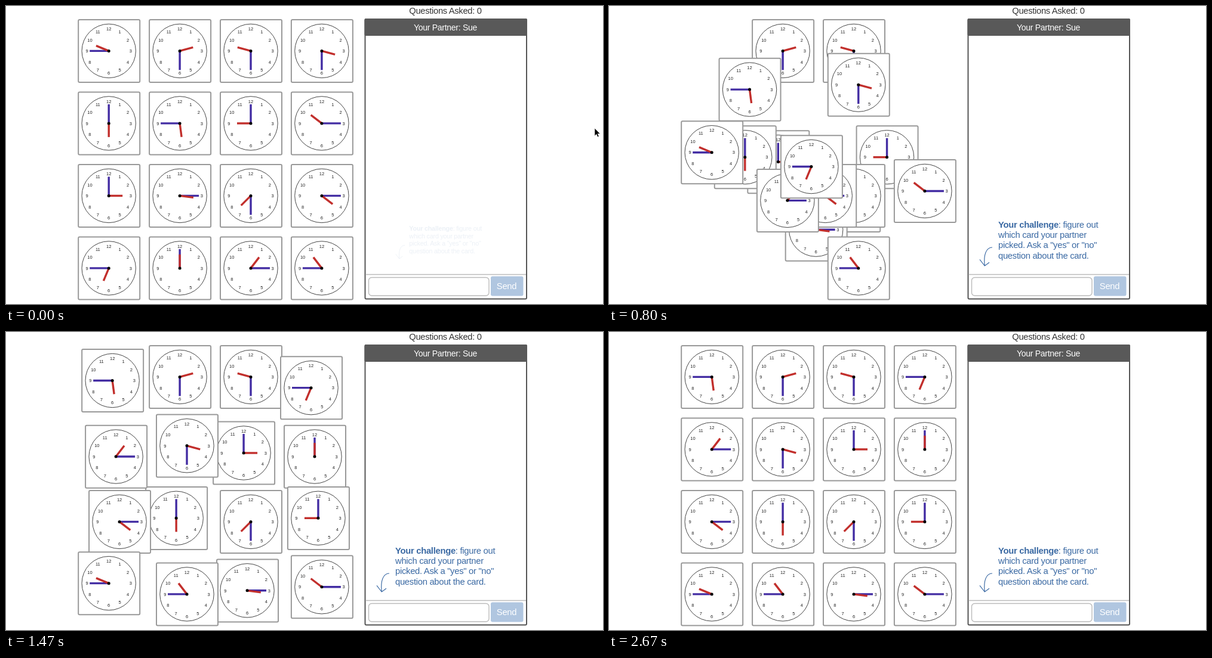
Animation, 1000 px wide and 500 px high, one loop 2730 ms. Source, as an HTML page:

```html
<!DOCTYPE html>
<html lang="en">
<head>
<meta charset="utf-8">
<title>Guess the clock card</title>
<style>
  html, body { margin: 0; width: 100%; height: 100%; overflow: hidden; background: #fff; }
  svg { display: block; width: 100%; height: 100%; }
  text { font-family: "Liberation Sans", Arial, sans-serif; letter-spacing: -.02em; }
  .middle { text-anchor: middle; }
  .numbers { font-size: 7.5px; fill: #222; text-anchor: middle; }
  .numbers text { letter-spacing: 0; }
  .note { font-size: 14.8px; fill: #3a69a3; }
</style>
</head>
<body>
<svg viewBox="0 0 1000 500">
  <g id="cards"></g>

  <text class="middle" x="736" y="12.7" font-size="14.7" fill="#333">Questions Asked: 0</text>
  <rect x="601.5" y="22" width="270.5" height="469.5" rx="2" fill="#fff" stroke="#555" stroke-width="2"/>
  <rect x="600.5" y="21" width="272.5" height="29" rx="2" fill="#595959"/>
  <text class="middle" x="736" y="41.2" font-size="14" fill="#fff">Your Partner: Sue</text>
  <path d="M602.5 450.5H871" stroke="#bbb" stroke-width="1.3"/>
  <rect x="607.5" y="455.5" width="201.5" height="30.5" rx="5" fill="#fff" stroke="#bbb" stroke-width="1.4"/>
  <rect x="812" y="453.5" width="54.5" height="33" rx="3" fill="#b0c6e0"/>
  <text class="middle" x="838.5" y="475.2" font-size="14.8" fill="#fff">Send</text>

  <g id="note" class="note">
    <text x="652" y="372"><tspan font-weight="bold">Your challenge</tspan>: figure out</text>
    <text x="652" y="389.2">which card your partner</text>
    <text x="652" y="406.4">picked. Ask a "yes" or "no"</text>
    <text x="652" y="423.7">question about the card.</text>
    <path d="M642 405C632 405 627 417 629.3 436M621 425.3L629.3 436L637 430.3"
          fill="none" stroke="#3a69a3" stroke-width="1.2"/>
  </g>

  <path id="cursor" d="M986 205v13l3-2.8 2 4.6 2.2-1-2-4.4h4z" fill="#000" stroke="#fff" stroke-width=".6"/>
</svg>

<script>
const LOOP = 2730;
const FRAME = 200 / 3; // each picture holds for 1/15 s

// Per card: hour, minute, start slot, end slot; listed from back to front.
const DEALS = [
  [2, 30, 1, 1], [9, 30, 2, 2], [12, 0, 13, 7], [9, 0, 6, 11],
  [3, 0, 8, 6], [3, 15, 9, 14], [6, 0, 4, 9], [7, 30, 10, 10],
  [10, 15, 7, 15], [4, 15, 11, 8], [3, 30, 3, 5], [5, 45, 5, 0],
  [1, 15, 14, 4], [9, 45, 0, 12], [10, 45, 15, 13], [6, 45, 12, 3]
];

const byId = id => document.getElementById(id);
const slotX = slot => 172.2 + 118.9 * (slot % 4);
const slotY = slot => 75.4 + 121.5 * Math.floor(slot / 4);
const mix = (a, b, p) => a + (b - a) * p;

function hand(degrees, length, color) {
  return `<path d="M0 0V${-length}" transform="rotate(${degrees})" stroke="${color}" stroke-width="3.4"/>`;
}

function clockCard(hour, minute) {
  let numbers = "";
  for (let n = 1; n <= 12; n++) {
    const angle = n * Math.PI / 6;
    numbers += `<text x="${36.7 * Math.sin(angle)}" y="${2.7 - 37 * Math.cos(angle)}">${n}</text>`;
  }
  return `<g>
    <rect x="-51" y="-52.4" width="103" height="105" rx="2" fill="#fff" stroke="#999" stroke-width="2"/>
    <circle r="45.2" fill="none" stroke="#444" stroke-width="1"/>
    <g class="numbers">${numbers}</g>
    ${hand(minute * 6, 32, "#432da3")}
    ${hand((hour + minute / 60) * 30, 23, "#c22f2c")}
    <circle r="2.5"/>
  </g>`;
}

// Standard "ease" timing: cubic-bezier(.25, .1, .25, 1), solved by bisection.
function ease(x) {
  if (x <= 0) return 0;
  if (x >= 1) return 1;
  const bezier = (a, b, s) => 3 * a * s * (1 - s) ** 2 + 3 * b * s * s * (1 - s) + s ** 3;
  let low = 0, high = 1;
  for (let i = 0; i < 24; i++) {
    const mid = (low + high) / 2;
    if (bezier(.25, .25, mid) < x) low = mid; else high = mid;
  }
  return bezier(.1, 1, low);
}

byId("cards").innerHTML = DEALS.map(([hour, minute]) => clockCard(hour, minute)).join("");
const cards = [...byId("cards").children];

function draw(now) {
  const time = Math.floor((now % LOOP + 4) / FRAME) * FRAME;

  const shuffle = ease((time - 384) / 1500);
  DEALS.forEach(([, , from, to], i) => {
    const x = mix(slotX(from), slotX(to), shuffle);
    const y = mix(slotY(from), slotY(to), shuffle);
    cards[i].setAttribute("transform", `translate(${x} ${y})`);
  });

  const reveal = ease((time + 50) / 500);
  byId("note").setAttribute("opacity", reveal);
  byId("note").setAttribute("transform",
    `translate(738 392) scale(${mix(.7, 1, reveal)}) translate(-738 -392)`);

  byId("cursor").style.display = time < FRAME ? "" : "none";
}

const start = performance.now();
function tick() {
  draw(performance.now() - start);
  requestAnimationFrame(tick);
}
tick();
</script>
</body>
</html>
```
